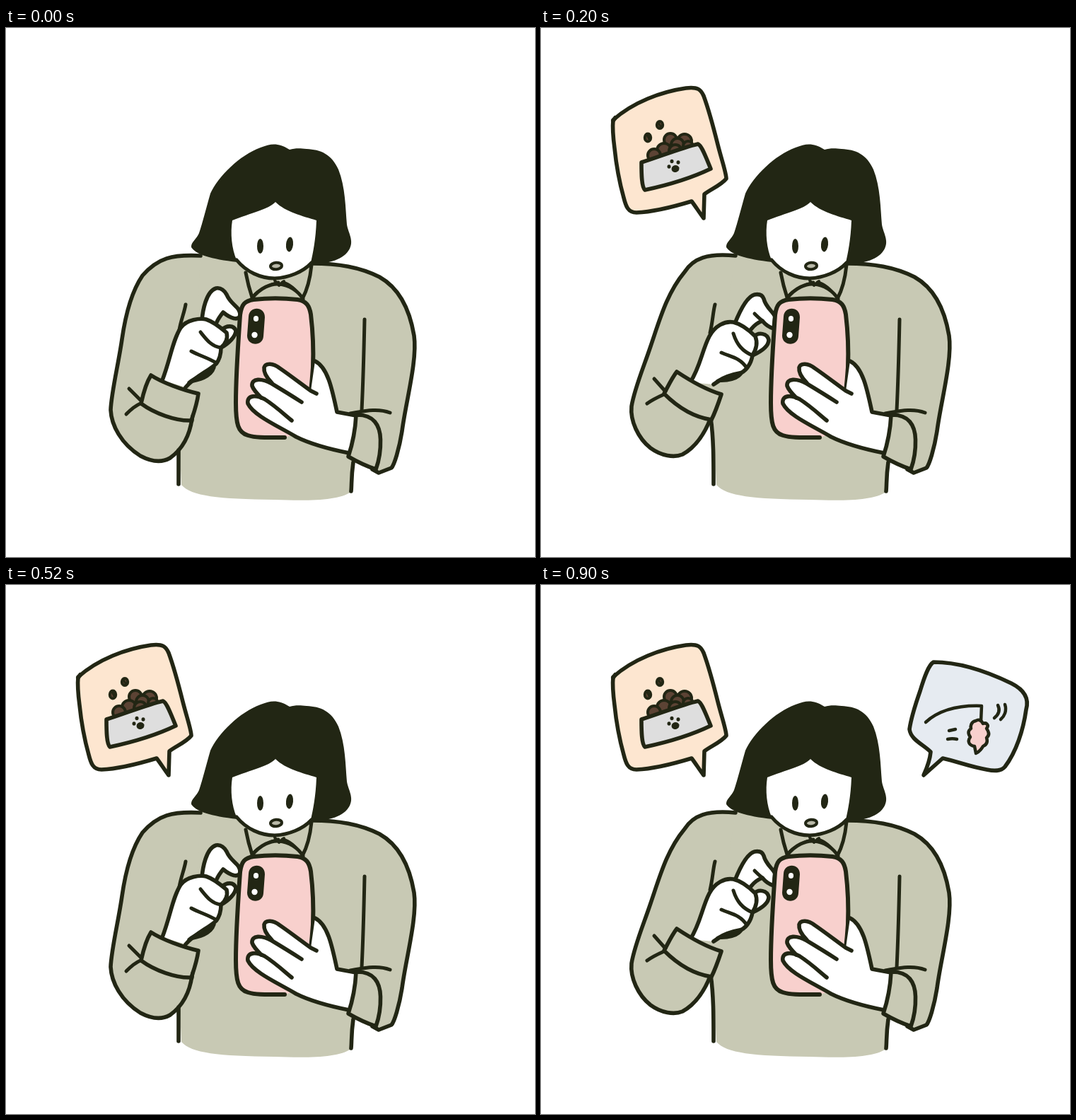
Recreate the animation shown at these times as an HTML page with a canvas. Size 748 by 748 pixels, loop 1100 ms.

```html
<!DOCTYPE html>
<html lang="en">
<head>
<meta charset="utf-8">
<title>Phone chat</title>
<style>
html, body { margin: 0; width: 100%; height: 100%; overflow: hidden; background: #fff; }
canvas { display: block; width: 100vw; height: 100vh; }
</style>
</head>
<body>
<canvas id="stage" width="748" height="748"></canvas>
<script>
const ctx = document.getElementById('stage').getContext('2d');
const INK = '#222614', SHIRT = '#c8c9b4', PINK = '#f8d0cd', WHITE = '#fff';
const PEACH = '#fde6d0', BLUE = '#e6ebf1', STEEL = '#dedede', BROWN = '#5c4334';
const LOOP = 1100;

ctx.lineCap = ctx.lineJoin = 'round';

function fill(d, color) {
  ctx.fillStyle = color;
  ctx.fill(new Path2D(d));
}

function line(d, width = 5.6) {
  ctx.strokeStyle = INK;
  ctx.lineWidth = width;
  ctx.stroke(new Path2D(d));
}

function shape(d, color, width) {
  fill(d, color);
  line(d, width);
}

function oval(x, y, rx, ry, color, width = 0, turn = 0) {
  ctx.beginPath();
  ctx.ellipse(x, y, rx, ry, turn, 0, Math.PI * 2);
  ctx.fillStyle = color;
  ctx.fill();
  if (!width) return;
  ctx.strokeStyle = INK;
  ctx.lineWidth = width;
  ctx.stroke();
}

function drawBody() {
  fill('M240 322L300 318L432 332C470 333 500 338 528 352C560 370 572 405 577 435' +
    'C582 470 565 530 560 570C556 595 549 618 545 622L527 629L490 612L488 656' +
    'C470 668 430 669 380 667C300 666 262 662 248 646L244 560L210 340Z', SHIRT);
}

function drawRightArm() {
  line('M432 333C470 333 500 338 528 352C560 370 572 405 577 435' +
    'C582 470 565 530 560 570C556 595 549 618 545 622L527 629L518 624');
  line('M507 412C506 460 505 500 503 541', 5);
  line('M491 614C488 635 489 645 488 655');
}

function drawHead() {
  line('M339 346C342 362 346 375 348 381C358 370 370 364 385 360', 5);
  line('M432 335C430 355 425 372 419 383C410 370 400 362 391 360', 5);
  shape('M348 382C360 367 375 361 386 362C400 363 413 372 420 383', SHIRT, 5);
  line('M380 357L386 364L393 358', 4);
  fill('M401 172C385 162 375 163 360 169C330 180 300 210 289 234C283 255 278 275 273 290' +
    'C270 298 261 303 262 310C268 320 290 327 327 331L433 334C455 333 478 328 486 312' +
    'C492 300 484 290 482 278C480 255 480 225 470 200C460 178 445 172 425 171C415 170 408 170 401 172Z', INK);
  fill('M320 272C345 262 372 256 381 246C395 260 420 266 439 272C438 300 434 318 431 332' +
    'C420 345 400 354 380 354C360 354 340 345 326 328C319 312 317 290 320 272Z', WHITE);
  line('M326 328C340 345 360 354 380 354C400 353 420 345 432 332', 5);
  oval(359.5, 308.5, 4.5, 10.5, INK);
  oval(401, 306, 5, 10.5, INK, 0, 0.1);
  oval(382, 336.5, 8, 4.8, '#b9b9a8', 4, -0.08);
}

const restPose = {
  arm: 'M275 322C235 320 215 325 193 350C176 375 168 412 164 440C159 475 149 515 148 540' +
    'C149 562 163 588 190 605C205 613 220 615 232 608C250 595 260 575 263 552',
  side: 'M244 597L244 645',
  crease: 'M254 391C252 403 247 414 245 427',
  index: 'M277 414C278 400 283 372 297 368C303 367 308 370 312 377C318 392 332 394 331 407' +
    'C328 414 318 411 307 402C303 407 300 411 298 416',
  bend: '',
  thumb: 'M305 427C312 420 322 420 325 428C325 436 315 446 304 452',
  palm: 'M221 498C232 470 236 440 247 424C255 412 275 410 283 412C295 416 305 425 312 431' +
    'C314 440 310 447 304 452C304 462 301 470 297 475C285 486 268 492 254 508',
  folds: 'M275 430C283 440 290 450 304 452M262 457C275 464 285 466 298 474',
  shade: 'M258 501C272 499 290 495 295 480C288 486 270 491 258 501Z',
  cuff: 'M205 491C220 501 250 512 272 517C270 532 266 543 262 555C240 556 210 545 191 531C194 517 198 502 205 491Z',
  elbow: 'M174 510L190 526M170 546C177 539 183 534 190 531M264 548L263 556'
};

const tapPose = {
  arm: 'M275 322C235 318 215 326 203 345C178 375 168 412 155 450C145 480 132 510 128 535' +
    'C126 555 137 580 155 594C170 605 188 608 200 603C220 592 233 570 240 551',
  side: 'M240 551C244 580 244 610 244 645',
  crease: 'M246 391C243 402 243 415 239 431',
  index: 'M274 418C280 403 290 380 302 377C308 376 313 377 315 383C318 395 327 400 331 408' +
    'L329 425C322 423 317 419 313 414C305 417 301 421 297 426',
  bend: 'M302 404C306 408 309 411 313 414',
  thumb: 'M300 437C308 429 320 432 322 441C322 450 310 458 299 463',
  palm: 'M211 501C225 480 228 455 238 436C246 421 260 414 272 416C285 419 295 428 303 436' +
    'C307 446 304 455 299 463C297 475 290 486 278 490C265 493 255 495 244 504',
  folds: 'M272 432C277 448 285 457 299 463M255 459C268 465 282 466 291 481',
  shade: 'M249 499C262 500 280 498 285 486C274 488 260 491 249 499Z',
  cuff: 'M192 486C210 498 235 512 255 518C251 530 247 542 241 554C215 550 192 535 174 517C180 506 185 495 192 486Z',
  elbow: 'M160 496L176 514M150 531C157 526 165 522 174 518'
};

function drawLeftArm(p) {
  fill(p.arm + 'Z', SHIRT);
  line(p.side);
  line(p.arm);
  line(p.crease, 5);
  shape(p.index, WHITE);
  line(p.bend, 5);
  shape(p.thumb, WHITE);
  shape(p.palm, WHITE);
  line(p.folds, 5);
  shape(p.shade, INK, 3.5);
  shape(p.cuff, SHIRT);
  line(p.elbow, 5);
}

function drawPhone() {
  const edge = 'M394 579C370 579 355 580 342 576C328 572 325 560 325 530C325 490 328 450 331 406' +
    'C333 390 338 386 350 384C375 381 395 382 412 384C425 386 429 393 431 405' +
    'C434 430 435 455 434 480C433 495 432 505 431 514';
  fill(edge + 'L425 570L394 579Z', PINK);
  line(edge, 6);
  fill('M343 408C344 393 366 393 366 409L364 436C363 451 341 450 341 435Z', INK);
  oval(353.5, 411, 3.6, 4, WHITE);
  oval(351.5, 434, 4.2, 4.2, WHITE);
}

function drawRightHand() {
  fill('M437 471C455 480 461 510 468 543L495 548L485 601C455 595 430 588 410 578' +
    'C385 563 350 548 342 531C340 521 351 518 361 524C355 517 350 512 348 506' +
    'C347 495 360 495 376 503C369 495 364 488 365 480C367 473 378 474 387 481C403 492 417 503 431 513Z', WHITE);
  line('M437 471C455 480 461 510 468 543L495 548');
  line('M485 601C455 595 430 588 410 578C385 563 350 548 342 531C340 518 355 519 366 525C380 534 392 545 404 555');
  line('M361 523C355 517 350 512 348 506C347 495 361 495 376 503C391 512 404 520 418 529');
  line('M376 502C369 495 364 488 365 480C367 473 378 474 387 481C403 492 417 503 431 513L439 517');
  shape('M495 547C520 546 529 562 529.5 582C530 600 527 613 523 624C508 619 496 613 484 606C490 588 494 568 495 547Z', SHIRT);
  line('M487 545C505 542 525 537 543 544', 5);
}

function drawFoodBubble() {
  shape('M102 130C130 105 170 90 205 85C222 83 226 87 230 96C237 115 245 145 250 165' +
    'C255 185 262 205 262 213C255 222 240 228 231 235L230 269C224 261 219 253 213 245' +
    'C190 252 160 260 135 261C123 261 120 252 117 240C110 215 106 190 104 170C102 155 101 140 102 130Z', PEACH);
  line('M102 131L105 127', 6);
  for (const [x, y, r] of [[183, 158, 9], [203, 160, 10], [193, 165, 9], [174, 173, 10], [160, 180, 9], [190, 174, 9], [208, 167, 7]])
    oval(x, y, r, r, BROWN, 4);
  shape('M142 190C165 183 200 169 222 164C227 166 232 180 240 199C215 211 180 222 147 229C142 225 142 205 142 190Z', STEEL);
  oval(190, 199, 5.5, 5, INK, 0, -0.3);
  for (const [x, y] of [[181, 196], [185, 188.5], [194, 190]]) oval(x, y, 2.5, 2.8, INK);
  oval(151, 155, 4.2, 5.5, BROWN, 4);
  oval(168, 137, 4.2, 5, BROWN, 4);
  line('M150 151L153 157M166 134L169 139', 3);
}

function drawToyBubble() {
  shape('M555 109C590 109 630 122 665 139C685 149 690 162 686 176C682 205 672 236 656 257' +
    'C650 264 640 263 630 261C607 257 590 250 568 245L541 269C546 258 550 247 551 236' +
    'C540 225 523 219 521 204C523 190 529 170 536 150C542 130 548 113 555 109Z', BLUE);
  line('M544 194C565 175 595 170 623 171L622 194', 4.5);
  shape('M615 192C608 193 607 200 608 203C602 207 605 212 607 215C602 222 606 227 613 228' +
    'L615 238C620 236 624 230 625 228C630 226 632 222 630 216C635 212 633 207 630 203' +
    'C634 198 630 194 625 196C622 190 618 190 615 192Z', PINK, 4.5);
  line('M646 170C650 178 646 184 641 188M656 169C659 178 655 186 650 190', 4.5);
  line('M577 206L586 204M575 218C579 217 584 217 588 218', 4.5);
}

function draw(t) {
  const tapping = (t >= 200 && t < 400) || t >= 600;
  ctx.fillStyle = WHITE;
  ctx.fillRect(0, 0, 748, 748);
  drawBody();
  drawRightArm();
  drawLeftArm(tapping ? tapPose : restPose);
  drawHead();
  drawPhone();
  drawRightHand();
  if (t >= 200) drawFoodBubble();
  if (t >= 600) drawToyBubble();
}

const start = performance.now();
function tick() {
  draw((performance.now() - start) % LOOP);
  requestAnimationFrame(tick);
}
tick();
</script>
</body>
</html>
```
